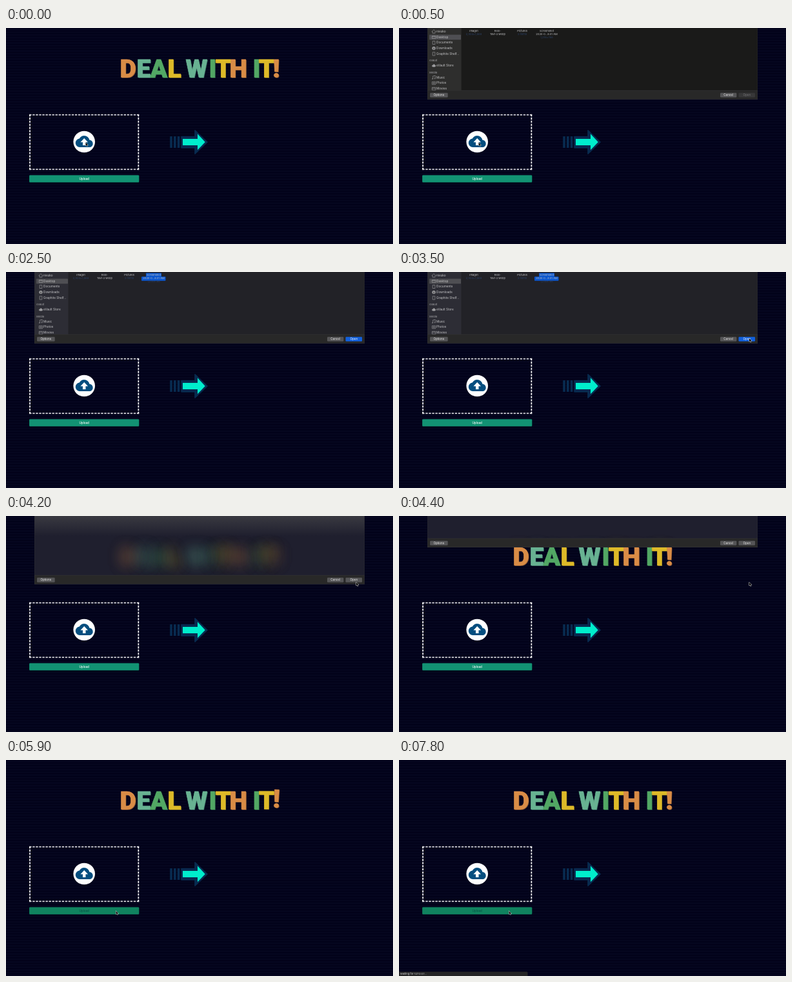
These frames come from a looping animation (600 px wide and 337 px high, 8 s). An HTML page with a canvas:

```html
<!DOCTYPE html>
<html lang="en">
<head>
<meta charset="utf-8">
<title>Deal with it</title>
<style>
html, body { margin: 0; width: 100%; height: 100%; overflow: hidden; background: #02021a; }
canvas { display: block; width: 600px; height: 337px; }
</style>
</head>
<body>
<canvas id="stage"></canvas>
<script>
const W = 600, H = 337, LOOP = 8000;
const canvas = document.getElementById('stage');
const ctx = canvas.getContext('2d');
const dpr = window.devicePixelRatio || 1;
canvas.width = W * dpr;
canvas.height = H * dpr;

const UI = 'Inter, Roboto, sans-serif';
const PAGE = 600 / 1440; // stage pixels per page pixel
const LETTER_COLORS = ['#d98c46', '#68b292', '#52a764', '#deba28'];
const SHADE_COLORS = ['#8c5a35', '#3f7265', '#34704a', '#8d7925'];
const TITLE = 'DEAL WITH IT!';
const LETTER_X = [176.5, 202.5, 223.5, 250.5, 0, 278.5, 314.5, 324.5, 346.5, 0, 382.5, 391.5, 413.5];
const CLOUD = new Path2D('M19.35 10.04A7.49 7.49 0 0 0 12 4C9.11 4 6.6 5.64 5.35 8.04A6 6 0 0 0 0 14c0 3.31 2.69 6 6 6h13c2.76 0 5-2.24 5-5 0-2.64-2.05-4.78-4.65-4.96zM14 13v4.3h-4V13H6.8L12 7.5l5.2 5.5z');

// Cursor stops: time, x, y
const CURSOR = [
  [0, 123.5, 178.5], [1500, 123.5, 178.5], [2250, 229, -9], [2600, 229, -9],
  [3500, 543, 103.5], [4450, 543, 103.5], [4950, 307.5, 175.5],
  [5050, 307.5, 175.5], [5650, 170.5, 235.5], [8000, 170.5, 235.5]
];

const clamp = v => Math.max(0, Math.min(1, v));
const span = (t, a, b) => clamp((t - a) / (b - a));
const ease = p => p * p * (3 - 2 * p);

function rect(x, y, w, h, fill, r = 0) {
  ctx.fillStyle = fill;
  ctx.beginPath();
  ctx.roundRect(x, y, w, h, r);
  ctx.fill();
}

function text(str, x, y, size, fill, align = 'left', weight = 400) {
  ctx.font = `${weight} ${size}px ${UI}`;
  ctx.textAlign = align;
  ctx.textBaseline = 'middle';
  ctx.fillStyle = fill;
  ctx.fillText(str, x, y);
}

function poly(points, fill, stroke, width) {
  ctx.beginPath();
  points.forEach(([x, y]) => ctx.lineTo(x, y));
  ctx.closePath();
  if (stroke) {
    ctx.strokeStyle = stroke;
    ctx.lineWidth = width;
    ctx.lineJoin = 'round';
    ctx.stroke();
  }
  ctx.fillStyle = fill;
  ctx.fill();
}

function drawBackground() {
  rect(0, 0, W, H, '#02021a');
  for (let y = 2; y < H; y += 10 * PAGE) rect(0, y, W, 1.2, '#070822');
}

function drawTitle(t) {
  ctx.font = '900 39px Roboto, "Open Sans", sans-serif';
  ctx.textAlign = 'left';
  ctx.textBaseline = 'alphabetic';
  ctx.lineJoin = 'round';
  ctx.lineWidth = 0.7;
  [...TITLE].forEach((ch, i) => {
    if (ch === ' ') return;
    const p = span(t, 4970 + i * 43, 5435 + i * 43);
    const half = ctx.measureText(ch).width / 2;
    ctx.save();
    ctx.translate(LETTER_X[i] + half, 77 - 9 * Math.sin(Math.PI * p));
    ctx.rotate(-0.05 * Math.sin(2 * Math.PI * p));
    ctx.fillStyle = SHADE_COLORS[i % 4];
    ctx.fillText(ch, 1 - half, 0.8);
    ctx.fillStyle = ctx.strokeStyle = LETTER_COLORS[i % 4];
    ctx.strokeText(ch, -half, 0);
    ctx.fillText(ch, -half, 0);
    ctx.restore();
  });
}

// Dashed border with a dash at every corner and evenly fitted gaps
function dashedBox(x, y, w, h, line) {
  const dash = line * 2;
  const side = (length, x0, y0, x1, y1) => {
    const n = Math.round((length + line) / (dash + line));
    ctx.setLineDash([dash, (length - n * dash) / (n - 1)]);
    ctx.beginPath();
    ctx.moveTo(x0, y0);
    ctx.lineTo(x1, y1);
    ctx.stroke();
  };
  const m = line / 2;
  ctx.strokeStyle = '#fff';
  ctx.lineWidth = line;
  for (const dy of [m, h - m]) side(w, x, y + dy, x + w, y + dy);
  for (const dx of [m, w - m]) side(h, x + dx, y, x + dx, y + h);
  ctx.setLineDash([]);
}

function drawUpload(t) {
  dashedBox(36.2, 134.7, 408 * PAGE, 208 * PAGE, 4 * PAGE);

  ctx.fillStyle = '#fff';
  ctx.beginPath();
  ctx.arc(121.2, 177.5, 16.8, 0, Math.PI * 2);
  ctx.fill();
  ctx.save();
  ctx.translate(107.8, 163.6);
  ctx.scale(1.12, 1.12);
  ctx.fillStyle = '#044e7f';
  ctx.fill(CLOUD, 'evenodd');
  ctx.restore();

  const hover = t >= 5550;
  rect(36.2, 229.8, 170, 11.2, hover ? '#0b6b54' : '#0d7259', 1);
  rect(36.2, 229.8, 170, 10.4, hover ? '#10835f' : '#129273', 1);
  text('Upload', 121.2, 235.2, 4.5, hover ? '#0a5347' : '#fff', 'center', 500);
}

function drawArrow() {
  const dark = '#082b50';
  for (const x of [254.2, 260, 265.8]) rect(x, 169, 3.6, 18, dark, 0.6);
  poly([[272, 169.5], [293, 169.5], [293, 159.8], [312, 178], [293, 196.2], [293, 187], [272, 187]], dark, dark, 1.6);
  poly([[274, 173], [297, 173], [297, 165.3], [308.8, 178], [297, 190.2], [297, 183], [274, 183]], '#00edcc');
}

function icon(kind, y) {
  const x = 54;
  ctx.strokeStyle = ctx.fillStyle = '#9b9b9e';
  ctx.lineWidth = 0.65;
  ctx.beginPath();
  if (kind === 'home') {
    [[-3, 0], [0, -3], [3, 0], [2, 0], [2, 2.5], [-2, 2.5], [-2, 0]].forEach(([a, b]) => ctx.lineTo(x + a, y + b));
    ctx.closePath();
  } else if (kind === 'down') {
    ctx.arc(x, y, 2.7, 0, 7);
    ctx.fill();
    ctx.beginPath();
    ctx.strokeStyle = '#333';
    ctx.moveTo(x, y - 1.5);
    ctx.lineTo(x, y + 1.4);
    ctx.moveTo(x - 1.1, y + 0.3);
    ctx.lineTo(x, y + 1.5);
    ctx.lineTo(x + 1.1, y + 0.3);
  } else if (kind === 'music') {
    ctx.moveTo(x - 1.4, y + 2);
    ctx.lineTo(x - 1.4, y - 2.3);
    ctx.lineTo(x + 2.2, y - 3);
    ctx.lineTo(x + 2.2, y + 1.3);
    ctx.moveTo(x - 1.4, y + 2);
    ctx.arc(x - 2, y + 2, 0.6, 0, 7);
    ctx.moveTo(x + 2.2, y + 1.4);
    ctx.arc(x + 1.6, y + 1.4, 0.6, 0, 7);
  } else if (kind === 'store') {
    ctx.ellipse(x, y + 0.4, 2.8, 1.4, 0, 0, 7);
    ctx.arc(x + 0.2, y - 0.5, 1.5, 0, 7);
    ctx.fill();
  } else if (kind === 'doc') {
    ctx.rect(x - 1.8, y - 2.6, 3.6, 5.2);
  } else {
    ctx.rect(x - 2.7, y - 2.1, 5.4, 4.2);
    if (kind === 'photo') {
      ctx.moveTo(x + 1.1, y);
      ctx.arc(x, y, 1.1, 0, 7);
    } else {
      ctx.moveTo(x - 2.7, y - 0.7);
      ctx.lineTo(x + 2.7, y - 0.7);
    }
  }
  ctx.stroke();
}

function drawSidebar(fill) {
  rect(44.3, 0, 52.2, 97.3, fill);
  rect(47, 10.6, 49, 7.6, '#4f4f53', 0.6);
  const items = [
    ['home', 'nivuko', 5.6], ['desk', 'Desktop', 14.4], ['doc', 'Documents', 23],
    ['down', 'Downloads', 31.6], ['doc', 'Graphite Shelf…', 40.4],
    ['store', 'eVault Store', 58.8], ['music', 'Music', 77.3],
    ['photo', 'Photos', 86], ['film', 'Movies', 94.8]
  ];
  for (const [kind, label, y] of items) {
    icon(kind, y);
    text(label, 58, y, 4.7, '#c8c8ca');
  }
  text('eVault', 47.3, 51.2, 4, '#96969a', 'left', 500);
  text('Media', 47.3, 69.8, 4, '#96969a', 'left', 500);
}

function drawFiles(selected) {
  const name = '#c0c0c3', info = '#2c4268';
  const label = (str, x, y, color = name) => text(str, x, y, 4.1, color, 'center');
  if (selected) {
    rect(217, 1.6, 24, 6.4, '#0b57cf', 1);
    rect(210, 7.3, 37.5, 6.4, '#0b57cf', 1);
  }
  label('Image1', 116, 4.8);
  label('2,924×1,668', 116, 9.8, info);
  label('Relo-', 153, 4.8);
  label('Tavi-2.webp', 153, 10);
  label('Pictures', 191, 4.8);
  label('2 items', 191, 9.8, info);
  label('Screenshot', 229, 4.8);
  label('2020-0…8.01 AM', 229, 10);
  label('1,216×766', 229, 15.2, info);
}

function drawButton(str, x, w, fill, color = '#eee') {
  rect(x, 101.2, w, 7.1, fill, 1.2);
  text(str, x + w / 2, 104.9, 4.5, color, 'center');
}

function drawDialog(t) {
  if (t < 100 || t >= 4650) return;
  const opening = 1 - Math.pow(1 - span(t, 100, 450), 2);
  const closing = Math.pow(span(t, 4130, 4500), 1.9);
  const y = -113 * (1 - opening) - 113 * closing;
  const leaving = t >= 4130;
  const fresh = t < 900;
  const selected = t >= 2350;

  ctx.save();
  ctx.translate(0, y);
  rect(44, -1, 512, 112.5, '#3a3a3c');
  rect(44.3, -1, 511.4, 112, '#282828');
  if (leaving) {
    const g = ctx.createLinearGradient(0, 3, 0, 36);
    g.addColorStop(0, '#3b3b42');
    g.addColorStop(1, '#1f1f2e');
    rect(44.3, -1, 511.4, 98.5, g);
    ctx.save();
    ctx.beginPath();
    ctx.rect(44.3, 0, 511.4, 97.3);
    ctx.clip();
    ctx.translate(0, -y);
    ctx.globalAlpha = 0.27;
    ctx.filter = `blur(${10 * dpr}px)`;
    drawTitle(0);
    ctx.restore();
  } else {
    rect(96.5, 0, 459.2, 97.3, fresh ? '#1a1a19' : '#222227');
    drawSidebar(fresh ? '#2e2e2d' : '#2d2d35');
    drawFiles(selected);
  }
  rect(44.3, 97.2, 511.4, 0.5, '#343436');
  drawButton('Options', 48, 27.7, '#555557');
  drawButton('Cancel', 498, 25.4, '#555557');
  if (leaving) drawButton('Open', 526.5, 25.6, '#555557');
  else if (selected) drawButton('Open', 526.5, 25.6, '#1260dc', '#fff');
  else drawButton('Open', 526.5, 25.6, '#373738', '#77777a');
  ctx.restore();
}

function drawStatus(t) {
  if (t < 6200) return;
  rect(-2, 330.3, 201.5, 9, '#252526', 1.5);
  text('Waiting for 127.0.0.1...', 1.8, 333.9, 4.1, '#d0d0d0');
}

function drawCursor(t) {
  const i = Math.max(1, CURSOR.findIndex(k => t < k[0]));
  const [t0, x0, y0] = CURSOR[i - 1], [t1, x1, y1] = CURSOR[i];
  const p = ease(span(t, t0, t1));
  ctx.save();
  ctx.translate(x0 + (x1 - x0) * p, y0 + (y1 - y0) * p);
  poly([[0, 0], [0, 5.2], [1.2, 4.2], [2.1, 6], [2.9, 5.6], [2.1, 3.9], [3.7, 3.8]], '#111', '#e8e8e8', 0.9);
  ctx.restore();
}

function frame(now) {
  const t = now % LOOP;
  ctx.setTransform(dpr, 0, 0, dpr, 0, 0);
  drawBackground();
  drawTitle(t);
  drawUpload(t);
  drawArrow();
  drawDialog(t);
  drawStatus(t);
  drawCursor(t);
  requestAnimationFrame(frame);
}
requestAnimationFrame(frame);
</script>
</body>
</html>
```
